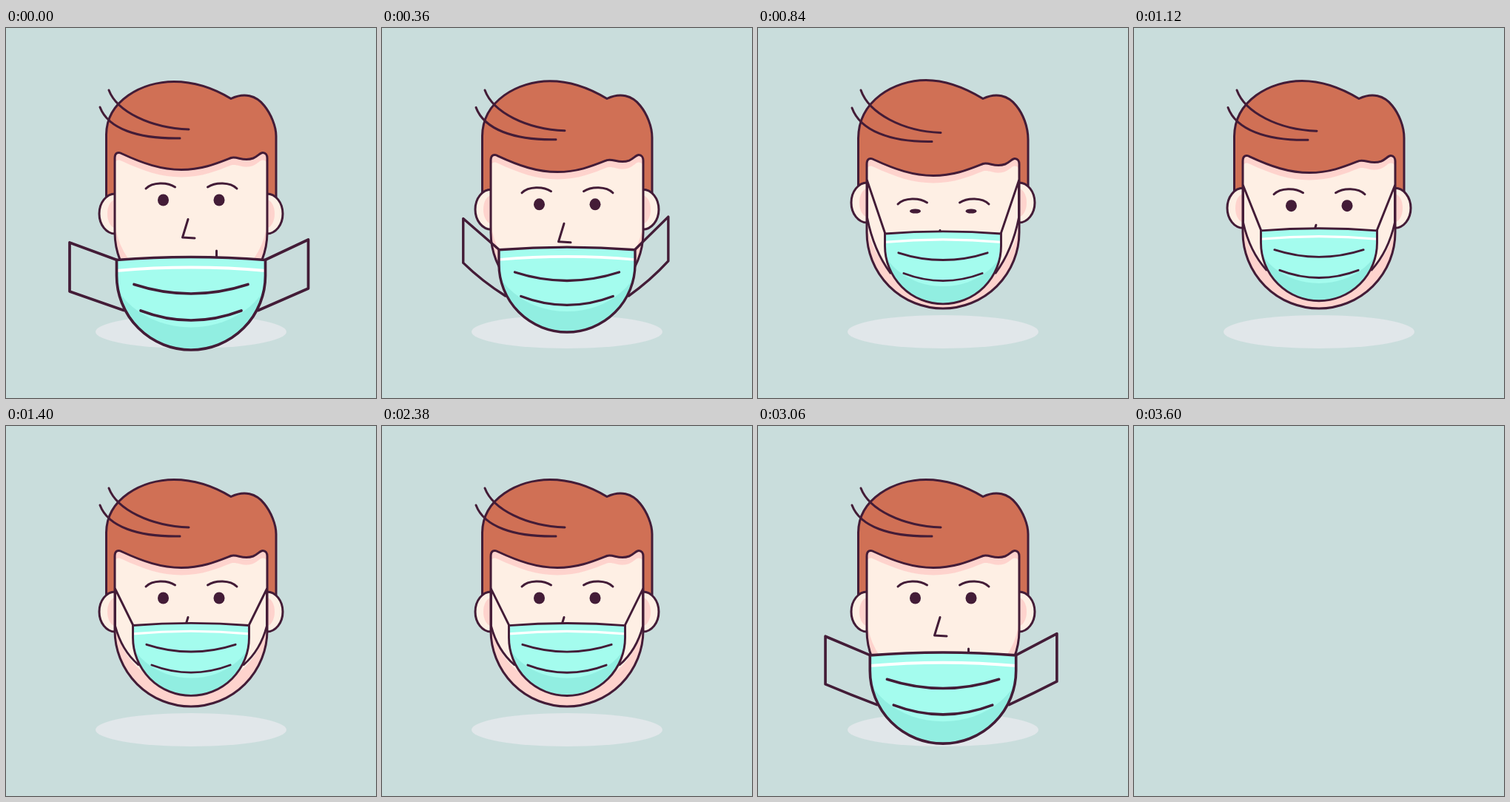
Animation, 500 px wide and 500 px high, one loop 3620 ms. Source, as an HTML page:

```html
<!DOCTYPE html>
<html lang="en">
<head>
<meta charset="utf-8">
<title>Putting on a mask</title>
<style>
  html, body { margin: 0; width: 100%; height: 100%; overflow: hidden; background: #c9dddc; }
  svg { display: block; width: 100%; height: 100%; }
  .line { fill: none; stroke: #431c37; stroke-width: 3; stroke-linecap: round; stroke-linejoin: round; }
  .ink { fill: #431c37; }
  .hair { fill: #d07055; }
  .skin { fill: #feefe4; }
  .blush { fill: #fed3cd; }
</style>
</head>
<body>
<svg viewBox="0 0 500 500">
  <defs>
    <clipPath id="faceClip"><path id="faceClipPath"/></clipPath>
    <path id="cloth" d="M-100.5 0Q0 -8 100.5 0V21A100.5 100.5 0 0 1 -100.5 21Z"/>
    <clipPath id="clothClip"><use href="#cloth"/></clipPath>
  </defs>
  <g id="scene">
    <ellipse cx="250" cy="410.5" rx="129" ry="22.5" fill="#e1e7ea"/>
    <path id="hair" class="line hair"/>
    <g id="ears">
      <ellipse class="line skin" cx="147.5" cy="251" rx="21.5" ry="27"/>
      <ellipse class="blush" cx="148" cy="251" rx="11" ry="19"/>
      <ellipse class="line skin" cx="352.5" cy="251" rx="21.5" ry="27"/>
      <ellipse class="blush" cx="352" cy="251" rx="11" ry="19"/>
    </g>
    <path id="faceBase" class="blush"/>
    <g clip-path="url(#faceClip)"><path id="faceLight" class="skin"/></g>
    <path id="faceLine" class="line"/>
    <path id="strands" class="line"/>
    <g id="features">
      <path id="brows" class="line" d="M189 217C198 208 218 208 228.5 215M272.5 215C283 208 303 208 312 217"/>
      <ellipse class="eye ink" cx="212.5" cy="232.5" rx="7.5" ry="8"/>
      <ellipse class="eye ink" cx="288" cy="232.5" rx="7.5" ry="8"/>
      <path class="line" d="M246 258.5L238.5 283L255 284M284.5 301V312"/>
    </g>
    <path id="straps" class="line"/>
    <g id="mask">
      <use href="#cloth" fill="#91eee1"/>
      <g clip-path="url(#clothClip)">
        <ellipse cy="-4" rx="112" ry="95" fill="#a4fcee"/>
        <path d="M-101 14.5Q0 5.5 101 14.5" fill="none" stroke="#fff" stroke-width="4"/>
      </g>
      <path class="line" style="stroke-width:3.7" d="M-77 33Q0 58 77 33M-68 68.5Q0 94.5 68 68.5"/>
      <use href="#cloth" class="line" style="stroke-width:3.7"/>
    </g>
  </g>
</svg>
<script>
const LOOP = 3620, STEP = 20, BLANK_AT = 3600;
const $ = id => document.getElementById(id);
const setPath = (id, d) => $(id).setAttribute('d', d);
const move = (id, y) => $(id).setAttribute('transform', `translate(0 ${y})`);
const mix = (a, b, p) => a + (b - a) * p;

function ease(t, from, to) {
  const x = Math.min(1, Math.max(0, (t - from) / (to - from)));
  return x * x * (3 - 2 * x);
}
const pulse = (t, from, peak, to) => ease(t, from, peak) - ease(t, peak, to);

// Face outline below a fringe shifted by dy, closed by a round jaw
function facePath(dy, jawY, jawR) {
  const y = v => v + dy;
  return `M147 ${jawY}V${y(176)}C147 ${y(168)} 152 ${y(167)} 157 ${y(170)}` +
    `C185 ${y(183)} 210 ${y(191.5)} 237 ${y(191.5)}` +
    `C265 ${y(191.5)} 285 ${y(183)} 304 ${y(175.5)}` +
    `C313 ${y(173)} 320 ${y(181)} 334 ${y(176)}` +
    `C341 ${y(173)} 343 ${y(168.5)} 347 ${y(168.5)}` +
    `C351 ${y(168.5)} 353 ${y(172)} 353 ${y(176)}V${jawY}A103 ${jawR} 0 0 1 147 ${jawY}Z`;
}

function drawHead(nod, squint) {
  const top = 72.5 - 2 * nod, side = 144 + 5 * nod;
  setPath('hair', `M135.5 235V${side}C136 98 184 ${top} 227 ${top}` +
    `C258 ${top} 285 84 304 95.5C322 87 338 91 349 105C358 116 365 133 365 ${side + 2}V235`);
  move('ears', -15 * nod);

  const outline = facePath(8 * nod, 276, 103);
  for (const id of ['faceClipPath', 'faceBase', 'faceLine']) setPath(id, outline);
  setPath('faceLight', facePath(8 * nod + 10, 255, 100));

  const d = 4.5 * nod;
  setPath('strands', `M139 84C150 ${113 + d / 2} 195 ${135 + d} 247 ${137 + d}` +
    `M127 ${107 + nod}C138 ${136 + d / 2} 178 ${150 + d} 235 ${149 + d}`);

  move('features', 15 * nod);
  move('brows', 6 * squint);
  for (const eye of document.querySelectorAll('.eye')) eye.setAttribute('ry', 8 - 5 * squint);
}

function drawMask(worn, nod) {
  const scale = 1 - 0.219 * worn;
  const y = 313.5 - 44 * worn + 8.5 * nod;
  $('mask').setAttribute('transform', `translate(250 ${y}) scale(${scale})`);

  const strap = (dir, outX, outY) => {
    const x = mix(outX, 250 + dir * 102.5, worn);
    const tipY = mix(outY, 220, worn) - 14 * nod;
    const lowY = mix(outY + 66, 270, worn) - 14 * nod;
    const endX = 250 + dir * 91 * scale, endY = y + 68 * scale;
    const bendX = (x + endX) / 2 + dir * 7 * worn, bendY = (lowY + endY) / 2 + 7 * worn;
    return `M${250 + dir * 100 * scale} ${y}L${x} ${tipY}V${lowY}Q${bendX} ${bendY} ${endX} ${endY}`;
  };
  setPath('straps', strap(-1, 86, 290) + strap(1, 408.5, 286));
  $('straps').style.strokeWidth = 3.7 * scale;
}

function draw(t) {
  const nod = pulse(t, 0, 850, 1400);
  const worn = ease(t, 0, 850) - ease(t, 2360, 3210);
  drawHead(nod, pulse(t, 600, 850, 1130));
  drawMask(worn, nod);
  $('scene').style.display = t >= BLANK_AT ? 'none' : '';
}

const start = performance.now();
function tick() {
  const t = (performance.now() - start) % LOOP;
  draw(Math.floor(t / STEP) * STEP);
  requestAnimationFrame(tick);
}
tick();
</script>
</body>
</html>
```
